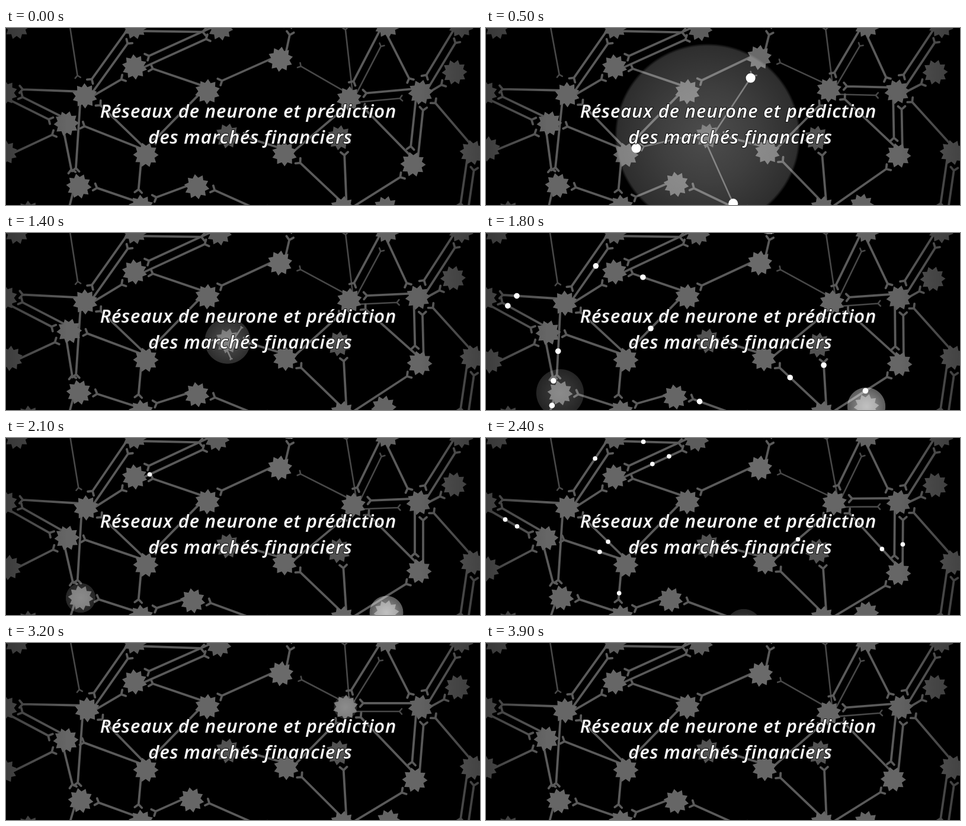
Write an HTML page with a canvas that moves like this. It is 800x300 px and loops after 4000 ms.

```html
<!DOCTYPE html>
<html lang="fr">
<head>
<meta charset="utf-8">
<title>Réseaux de neurone</title>
<style>
  html, body { margin: 0; width: 800px; height: 300px; overflow: hidden; background: #000; }
  canvas, svg { position: absolute; left: 0; top: 0; display: block; }
  text {
    font: italic 600 31px "Open Sans", "Noto Sans", sans-serif;
    letter-spacing: .9px;
    text-anchor: middle;
    fill: #fff;
    stroke: #111;
    stroke-width: 2px;
    stroke-linejoin: round;
    paint-order: stroke;
  }
</style>
</head>
<body>
<canvas id="net" width="800" height="300"></canvas>
<svg width="800" height="300">
  <text x="409" y="152">Réseaux de neurone et prédiction</text>
  <text x="412.5" y="196">des marchés financiers</text>
</svg>
<script>
const ctx = document.getElementById('net').getContext('2d');
const LOOP = 4000, STEP = 100, SPEED = 0.244, LANE = 7;
const KEYS = [0, 500, 900, 1800, 2400, 3200, LOOP];

// x, y, grey level, then the offsets reached at each inner key time
const node = (x, y, grey = 102, ...drift) => ({ x, y, grey, drift: [0, 0, ...drift, 0, 0] });

const nodes = {
  A: node(18, -2, 80),
  B: node(217, -2, 92),
  C: node(362, 0, 92, -1, 1, 1, 0, -5, 0, -7, 2, -3, 3),
  D: node(217, 66),
  E: node(133, 115, 102, 4, -2, 1, -1, 0, 4, 4, 3, 4, -2),
  F: node(340, 108),
  G: node(463, 53, 106, -2, -3, -1, -2, -1, -2, -1, -2, 1, -1),
  H: node(374, 183, 82),
  I: node(102, 162, 102, 5, 0, 7, 1, 3, 7, -1, 8, -1, 3),
  J: node(236, 215),
  K: node(123, 268, 102, -2, -1, -2, 1, 2, 3, 4, 3, 3, -1),
  L: node(322, 269, 102, -1, -4, 4, 0, -3, 9, -11, 5, -9, -3),
  M: node(228, 304),
  N: node(470, 213, 102, 5, -3, 5, -1, -1, 0, 1, -3, 3, -2),
  O: node(579, 120, 102, 0, -15, -5, -10, 5, -2, 9, -10, -6, -11),
  P: node(563, 186, 82, -5, 1, -1, -1, -2, 4, -3, 6, -2, 0),
  Q: node(700, 109, 98, -6, -1, -7, -1, -3, 1, -3, 0, 0, 0),
  R: node(757, 75, 84, 1, 0, -2, 0, -3, 3, 1, 5, 5, 0),
  S: node(687, 231, 102, 9, -15, 11, -12, 11, -9, 9, -2, 3, 1),
  T: node(787, 211, 96),
  U: node(643, -4, 98),
  V: node(768, -4, 84),
  W: node(-2, 110, 88),
  X: node(-2, 211, 88, 5, -6, 9, -4, 9, 6, 4, 11, -1, 6),
  Y: node(568, 306),
  Z: node(641, 306, 100, -7, -4, -9, -6, 1, -12, 1, -8, 5, -3),
  a: node(435, 320),
  c: node(770, 328),
  e: node(478, -19),
  k: node(106, 335),
  m: node(38, 314, 80),
  o: node(562, -32),
  x: node(110, -35)
};

// Each pair reads "from, to"
const thick = ('BE EB ED CD DC BC FD GF FJ Ge EW EK IW WI IK XI JI JE JM MK LM aL ' +
  'Kk NH NO YN YP YS QS SQ SO TQ QO UO UQ VQ QV QR Tc cT').split(' ');
const thin = 'OG OU OQ Oo xE'.split(' ');
const sprouts = 'HG HJ Ha'.split(' ');

// Time, cells that fire, dot radius
const volleys = [
  [0, 'H', 8], [695, 'JG', 6.3], [1465, 'EIFYa', 4.8], [1700, 'K', 4.8],
  [1998, 'D', 3.8], [2125, 'DNW', 3.8], [2200, 'BJS', 3.8], [2220, 'W', 3.8]
];

// Cell, start, duration, radius, strength
const glows = [
  ['H', 0, 1700, 157, 0.3], ['K', 1680, 600, 60, 0.24], ['Z', 1704, 600, 60, 0.6],
  ['e', 1710, 600, 42, 0.8], ['a', 2310, 600, 60, 0.24], ['O', 3050, 500, 20, 0.25]
];

const lerp = (a, b, u) => a + (b - a) * u;
const gray = v => `rgb(${v},${v},${v})`;
const swell = u => u <= 0 || u >= 1 ? 0 : u < 0.294 ? u / 0.294 : (1 - u) / 0.706;

function place(n, t) {
  if (n.drift.length < 5) return { x: n.x, y: n.y };
  const i = KEYS.findIndex(k => k > t) - 1;
  const u = (t - KEYS[i]) / (KEYS[i + 1] - KEYS[i]);
  const at = j => n.x * 0 + lerp(n.drift[2 * i + j], n.drift[2 * i + 2 + j], u);
  return { x: n.x + at(0), y: n.y + at(1) };
}

// Each direction keeps to its own right-hand lane
function lane(pos, pair, gap) {
  const a = pos[pair[0]], b = pos[pair[1]];
  const d = Math.hypot(b.x - a.x, b.y - a.y);
  const ux = (b.x - a.x) / d, uy = (b.y - a.y) / d;
  return {
    len: d - gap,
    angle: Math.atan2(uy, ux),
    at: s => [a.x - uy * LANE + ux * s, a.y + ux * LANE + uy * s]
  };
}

function axon(pos, pair, gap, width, arm, color, reach = 1) {
  const l = lane(pos, pair, gap), [x, y] = l.at(l.len * reach);
  ctx.strokeStyle = color;
  ctx.lineWidth = width;
  ctx.beginPath();
  ctx.moveTo(...l.at(0));
  ctx.lineTo(x, y);
  for (const side of [-0.85, 0.85]) {
    ctx.moveTo(x, y);
    ctx.lineTo(x + arm * Math.cos(l.angle + side), y + arm * Math.sin(l.angle + side));
  }
  ctx.stroke();
}

function star({ x, y }, color, turn) {
  ctx.fillStyle = color;
  ctx.beginPath();
  for (let i = 0; i < 20; i++) {
    const r = i % 2 ? 15.5 : 21.5, q = turn + i * Math.PI / 10;
    ctx.lineTo(x + r * Math.cos(q), y + r * Math.sin(q));
  }
  ctx.fill();
}

function disc(x, y, r, fill) {
  ctx.fillStyle = fill;
  ctx.beginPath();
  ctx.arc(x, y, r, 0, 2 * Math.PI);
  ctx.fill();
}

function glow({ x, y }, r, strength) {
  const g = ctx.createRadialGradient(x, y, 0, x, y, r);
  [[0, 1], [0.5, 0.82], [0.97, 0.6], [1, 0]].forEach(([stop, k]) =>
    g.addColorStop(stop, `rgba(255,255,255,${strength * k})`));
  disc(x, y, r, g);
}

function shadeSides() {
  const g = ctx.createLinearGradient(0, 0, 800, 0);
  [[0, 0.3], [0.13, 0], [0.87, 0], [1, 0.3]].forEach(([stop, k]) =>
    g.addColorStop(stop, `rgba(0,0,0,${k})`));
  ctx.fillStyle = g;
  ctx.fillRect(0, 0, 800, 300);
}

function draw(t) {
  const pos = {};
  for (const id in nodes) pos[id] = place(nodes[id], t);

  ctx.fillStyle = '#000';
  ctx.fillRect(0, 0, 800, 300);
  ctx.lineCap = 'round';
  thin.forEach(p => axon(pos, p, 36, 2.6, 6, gray(72)));
  thick.forEach(p => axon(pos, p, 30, 3.8, 8, gray(90)));
  const reach = swell(t / 1700);
  if (reach) sprouts.forEach(p => axon(pos, p, 33, 2.6, 8 * reach, gray(90), reach));

  Object.keys(nodes).forEach((id, i) => star(pos[id], gray(nodes[id].grey), i * 0.7));
  shadeSides();

  for (const [id, start, span, r, strength] of glows) {
    const k = swell((t - start) / span);
    if (k) glow(pos[id], r * k, strength);
  }

  const routes = [...thick, ...sprouts];
  for (const [start, cells, r] of volleys) {
    const s = (t - start) * SPEED;
    if (s <= 0) continue;
    for (const p of routes) {
      if (!cells.includes(p[0])) continue;
      const l = lane(pos, p, 30);
      if (s < l.len + 12) disc(...l.at(s), r, '#fff');
    }
  }
}

const begin = performance.now();
function tick() {
  const t = performance.now() - begin;
  draw(Math.floor(t / STEP) * STEP % LOOP);
  requestAnimationFrame(tick);
}
tick();
</script>
</body>
</html>
```
